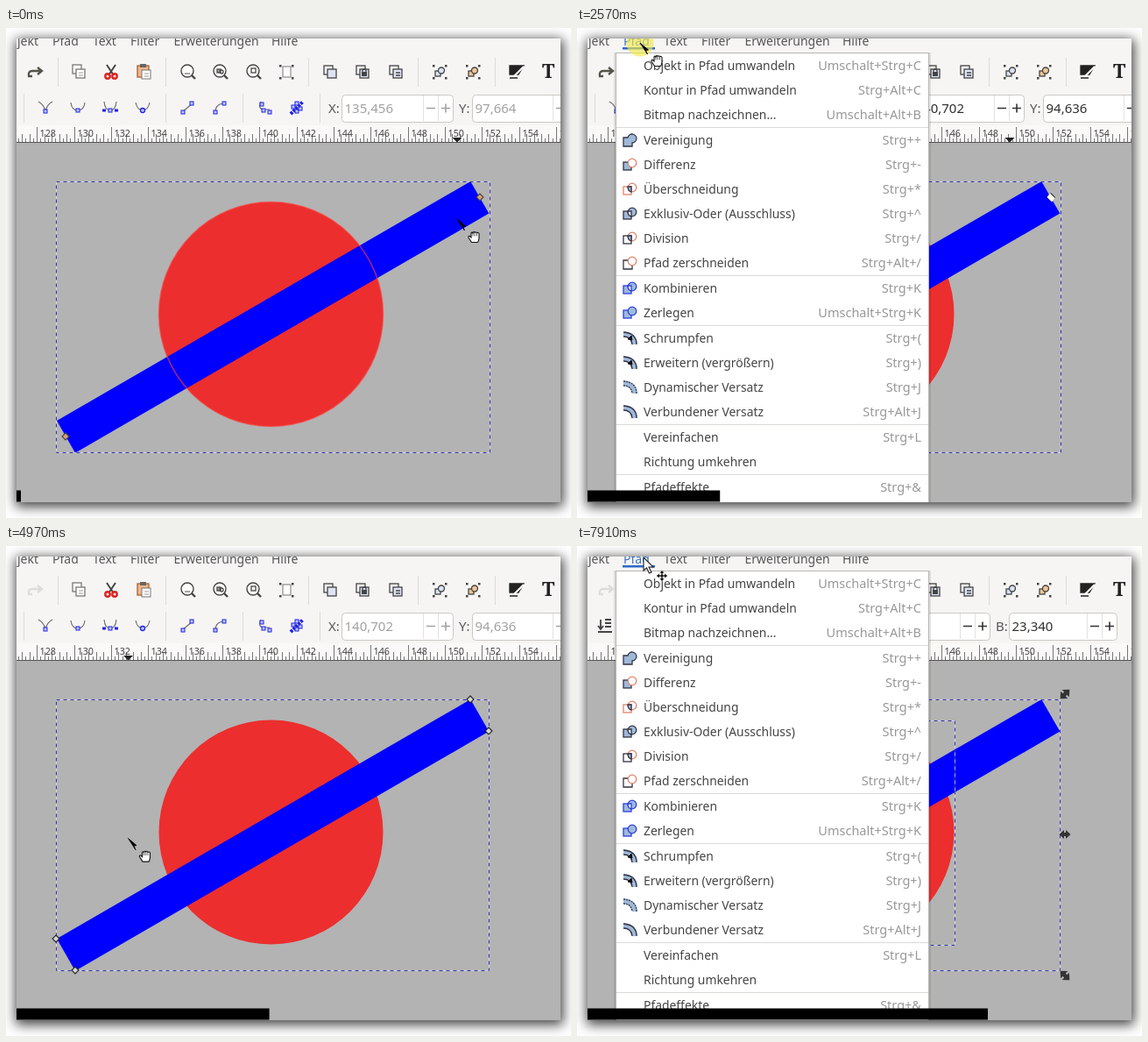
An HTML page that plays this animation: 645 px wide and 559 px high, repeating every 8000 ms.

```html
<!DOCTYPE html>
<html lang="de">
<head>
<meta charset="utf-8">
<title>Objekt in Pfad umwandeln</title>
<style>
html, body { margin: 0; width: 100%; height: 100%; overflow: hidden; background: #fff; }
#shadow { position: absolute; left: 12px; top: 12px; width: 621px; height: 529px; box-shadow: 1px 3px 13px 2px rgba(0,0,0,.75); }
svg { position: absolute; left: 0; top: 0; display: block; }
text { font-family: "Noto Sans", "Open Sans", sans-serif; white-space: pre; }
.off { display: none; }
</style>
</head>
<body>
<div id="shadow"></div>
<svg id="stage" width="645" height="559" viewBox="0 0 645 559"></svg>
<script>
const LOOP = 8000, STEP = 77.5, LAST = 102;
const INK = '#444', NODE = '#2222e0';

const text = (x, y, s, size = 14, fill = INK, extra = '') =>
  `<text x="${x}" y="${y}" font-size="${size}" fill="${fill}" ${extra}>${s}</text>`;
const rect = (x, y, w, h, extra) => `<rect x="${x}" y="${y}" width="${w}" height="${h}" ${extra}/>`;
const path = (d, stroke = INK, fill = 'none', w = 1.3, extra = '') =>
  `<path d="${d}" stroke="${stroke}" fill="${fill}" stroke-width="${w}" ${extra}/>`;
const circle = (x, y, r, stroke = INK, fill = 'none', w = 1.3) =>
  `<circle cx="${x}" cy="${y}" r="${r}" stroke="${stroke}" fill="${fill}" stroke-width="${w}"/>`;
const at = (x, y, body, extra = '') => `<g transform="translate(${x} ${y}) ${extra}">${body}</g>`;
const group = (id, body) => `<g id="${id}">${body}</g>`;
const divider = (x, y) => rect(x, y - 16, 1, 33, 'fill="#dedbd8"');
const box = (x, y, s, fill = 'none', stroke = INK) =>
  rect(x, y, s, s, `fill="${fill}" stroke="${stroke}" stroke-width="1.3"`);
const dashed = (x, y, w, h) => {
  const d = `M${x} ${y}h${w}v${h}h${-w}z`;
  return path(d, '#e4e4f4', 'none', 1, 'opacity=".75"') +
         path(d, '#3434b4', 'none', 1, 'stroke-dasharray="4 4"');
};

// Upper toolbar
const lens = body => circle(-1, -1, 7, INK, '#fff', 1.4) + path('M4 4L8 8', INK, 'none', 2.4) + body;
const padlock = rect(-1, 0, 6, 5, `fill="${INK}"`) + path('M0 0v-2q2-2 4 0v2');
const stack = body => box(-7, -7, 10, '#f6f5f4') + box(-3, -3, 10, '#dfe3f4') + body;
const corners = fill => [[-8, -8], [6, -8], [-8, 6], [6, 6]]
  .map(([x, y]) => rect(x, y, 2.5, 2.5, `fill="${fill}"`)).join('');
const grouped = fill => corners(INK) + box(-5, -1, 6, fill) + circle(2, -1.5, 3.5, INK, fill);

function upperBar() {
  const redo = 'M7 -1H-3q-5 0 -4 6h4M3 -5l5 4-5 4';
  const icons = [
    [83, box(-7, -8, 10, '#fff', '#777') + box(-3, -3, 10, '#fff', '#777') + path('M0 1h5M0 4h5', '#999', 'none', 1)],
    [120, path('M-5 -8L3 4M5 -8L-3 4', '#444', 'none', 2) + circle(-4, 5, 2.7, '#d22', 'none', 2.4) + circle(4, 5, 2.7, '#d22', 'none', 2.4)],
    [157, box(-7, -7, 13, '#efb78c', '#a8602e') + rect(-4, -9, 7, 4, 'fill="#666"') + rect(-2, -2, 10, 10, 'fill="#fff" stroke="#777"') + path('M1 2h5M1 5h5', '#999', 'none', 1)],
    [208, lens(path('M-4 2h6', '#777'))],
    [245, lens(box(-4, -3, 4, '#aaa') + circle(1, 0, 2))],
    [283, lens(box(-3, -4, 5))],
    [320, rect(-4, -6, 9, 12, 'fill="#fff" stroke="#777"') + corners(INK)],
    [370, stack('')],
    [407, stack(padlock)],
    [445, stack(path('M0 1h5M0 4h5', INK, 'none', 1.6))],
    [495, grouped('#d9e1f5')],
    [533, grouped('#f0c596')],
    [583, path('M-8 -7H8L2 3H-8z', '#222', '#222') + path('M8 -6L-3 5', '#fff', 'none', 2.2) + path('M-8 7H1', '#222', 'none', 1.5)]
  ];
  return group('redo', at(33, 50, path(redo, '#54534b', 'none', 2.3))) +
    icons.map(([x, body]) => at(x, 50, body)).join('') +
    [59, 182, 345, 470, 558].map(x => divider(x, 50)).join('') +
    text(612, 57, 'T', 22, '#222', 'font-weight="bold" style="font-family:\'Noto Serif\',serif"');
}

// Lower toolbars
function field(label, x, end, id, value) {
  const line = dx => rect(end - dx, 77, 1, 29, 'fill="#e4e1de"');
  return text(x - 16, 97, label, 15, '#555') +
    rect(x - .5, 76.5, end - x, 31, 'rx="4" fill="#fff" stroke="#cdc7c2"') + line(35) + line(18) +
    `<g class="entry">${text(x + 2.5, 97, value, 15, '#303030', `id="${id}"`)}` +
    path(`M${end - 31} 91.5h10M${end - 14} 91.5h10m-5 -5v10`, '#333', 'none', 1.6) + '</g>';
}

function nodeBar() {
  const dot = (x, y) => rect(x - 2, y - 2, 4, 4, `fill="#b9c6ff" stroke="${NODE}"`);
  const curve = d => path(d, '#666', 'none', 1.1);
  const icons = [
    [45, curve('M-8 -7Q-2 -4 0 4Q2 -4 8 -7') + dot(0, 4)],
    [82, curve('M-8 -6Q-7 3 0 3Q7 3 8 -6') + dot(0, 3)],
    [119, curve('M-7 -7Q-6 3 0 3Q6 3 7 -7') + dot(0, 3) + path('M-9 3h4M5 3h4', NODE, 'none', 3)],
    [156, curve('M-8 -6Q-6 3 0 3Q6 3 8 -6') + circle(0, 3, 2.5, NODE, '#b9c6ff')],
    [207, curve('M-6 5L6 -5') + dot(-5, 5) + dot(5, -5)],
    [244, curve('M-5 5Q-5 -5 6 -5') + dot(-5, 5) + dot(5, -5)],
    [295, curve('M-4 -7Q-8 2 0 2H6') + dot(-3, -4) + dot(-1, 3) + dot(6, 5)],
    [332, path('M-7 7L7 -7', NODE, 'none', 4, 'stroke-dasharray="3 1"') + dot(-4, -1) + dot(0, 4) + dot(4, 1) + dot(0, -5)]
  ];
  return icons.map(([x, body]) => at(x, 91, body)).join('') +
    [20, 182, 270, 358].map(x => divider(x, 91)).join('') +
    field('X:', 384, 511, 'nodeX', '') + field('Y:', 533, 659, 'nodeY', '');
}

function selectBar() {
  const bars = 'M-1 -6h8M-1 -2h5M-1 2h8M-1 6h5';
  const icons = [
    [32, path('M-8 7H8M0 -7H7M0 -3H7M0 1H7M-5 -7V3m-3 -3l3 4 3-4', INK, 'none', 1.8)],
    [69, path(bars + 'M-8 0h6m-3 -3l-3 3 3 3', INK, 'none', 1.8)],
    [106, path('M-7 -7V7M-7 -5H4M-7 -1H1M-7 3H8M2 0l4 3-4 3', INK, 'none', 1.8)],
    [143, path('M-8 -7H8M-7 -3h6M-7 1h6M-7 5h6M4 7V-3m-3 3l3-4 3 4', INK, 'none', 1.8)]
  ];
  return icons.map(([x, body]) => at(x, 91, body)).join('') + divider(169, 91) +
    field('X:', 195, 323, 'selX', '129,031') + field('Y:', 344, 472, 'selY', '87,320') +
    field('B:', 494, 617, 'selB', '23,340');
}

function ruler() {
  let ticks = '', labels = '';
  for (let i = -6; i < 142; i++) {
    const x = Math.round(35.2 + i * 4.234) + .5, major = i % 10 === 0;
    ticks += `M${x} 130V${major ? 113 : i % 2 ? 126 : 121}`;
    if (major) labels += text(x + 3, 124, 128 + i / 5, 10.8, '#444');
  }
  return rect(12, 111, 621, 19, 'fill="#faf9f8"') + path(ticks, '#777', 'none', 1) + labels +
    path('M12 130.5H633', '#555', 'none', 1) + group('marker', '<path d="M-5.5 125h11l-5.5 5.5z" fill="#222"/>');
}

// Canvas objects and their handles
const DIAMOND = 'M0 -4L4 0 0 4-4 0z';
const ARROW = 'M-6.5 0L-1 -5V-2H1V-5L6.5 0 1 5V2H-1V5z';
const ends = [[541, 193], [68, 466]];

function drawing() {
  const arrow = (x, y, angle, scale = 1) =>
    at(x, y, `<path d="${ARROW}" fill="#333"/>`, `rotate(${angle}) scale(${scale})`);
  const arrows = [arrow(51, 329, 0), arrow(557, 329, 0), arrow(304, 169, 90), arrow(304, 490, 90),
    arrow(51, 169, 45, 1.15), arrow(557, 490, 45, 1.15), arrow(557, 169, -45, 1.15), arrow(51, 490, -45, 1.15)];
  return rect(12, 131, 621, 410, 'fill="#b3b3b3"') +
    '<circle cx="302.5" cy="326.5" r="128" fill="#ec2e2e"/>' +
    '<path d="M530.3 175L551.3 211.6 79 484.7 58 448z" fill="#00f"/>' +
    group('outline', '<circle cx="302.5" cy="326.5" r="128" fill="none" stroke="#ff3c3c" stroke-opacity=".62" stroke-width="1.5"/>') +
    group('wideBox', dashed(57.5, 175.5, 495, 309)) + group('tightBox', dashed(57.5, 175.5, 494, 309)) +
    group('circleBox', dashed(175.5, 199.5, 256, 256)) +
    group('idleNodes', ends.map(([x, y]) => at(x, y, path(DIAMOND, '#444', '#d9a07c', 1.1))).join('')) +
    group('pickedNodes', ends.map(([x, y]) => at(x, y,
      path('M0 -4.5L4.5 0 0 4.5 -4.5 0z', '#333', '#333', 1) + path('M-4 0L-1 -4 4 1 1 5z', '#fff', '#fffbe8', .8))).join('')) +
    group('cornerNodes', [[530, 175], [551, 211], [79, 484], [57, 448]]
      .map(([x, y]) => at(x, y, path(DIAMOND, '#222', '#d8d8d8', 1.1))).join('')) +
    group('arrows', arrows.join(''));
}

// Path menu: [centre y, label, shortcut, icon]
const LIGHT = '#9fb9d8', RED = '#e0826a', BLUE = '#2a3fe0';
const overlap = (stroke, fill) => path('M-2 -3H2V3Q-2 2 -2 -3z', stroke, fill);
const pair = (square, round, fill) => box(-7, -3, 9, fill, square) + circle(3, -2, 4.8, round, fill);
const offset = dash => path('M-7 -5Q5 -4 6 7', LIGHT, 'none', 6) +
  path('M-7 -7Q8 -6 8 7M-7 -2Q2 -2 3 7', '#334', 'none', 1.3, dash ? 'stroke-dasharray="2 1"' : '');
const inset = offset(false) + path('M-2 1l4-4 1 5z', '#111', '#111', 1);
const items = [
  [43, 'Objekt in Pfad umwandeln', 'Umschalt+Strg+C', ''],
  [71, 'Kontur in Pfad umwandeln', 'Strg+Alt+C', ''],
  [99, 'Bitmap nachzeichnen...', 'Umschalt+Alt+B', ''],
  [128, 'Vereinigung', 'Strg++', path('M-7 -3H-2A5 5 0 1 1 3 3V7H-7z', '#334', LIGHT)],
  [156, 'Differenz', 'Strg+-', box(-7, -3, 9, LIGHT, '#334') + circle(3, -2, 4.8, RED, '#fff')],
  [184, 'Überschneidung', 'Strg+*', pair(RED, RED, 'none') + overlap('#334', LIGHT)],
  [212, 'Exklusiv-Oder (Ausschluss)', 'Strg+^', pair('#334', '#334', LIGHT) + overlap('#334', '#fff')],
  [240, 'Division', 'Strg+/', pair('#334', RED, 'none') + overlap('#334', LIGHT)],
  [268, 'Pfad zerschneiden', 'Strg+Alt+/', path('M-2 -3H-7V7H3V3', '#334') + circle(3, -2, 4.8, RED)],
  [297, 'Kombinieren', 'Strg+K', pair(BLUE, BLUE, LIGHT) + overlap(BLUE, '#fff')],
  [325, 'Zerlegen', 'Umschalt+Strg+K', pair(BLUE, BLUE, LIGHT)],
  [354, 'Schrumpfen', 'Strg+(', inset],
  [382, 'Erweitern (vergrößern)', 'Strg+)', inset],
  [410, 'Dynamischer Versatz', 'Strg+J', offset(true)],
  [438, 'Verbundener Versatz', 'Strg+Alt+J', offset(false)],
  [467, 'Vereinfachen', 'Strg+L', ''],
  [495, 'Richtung umkehren', '', ''],
  [524, 'Pfadeffekte', 'Strg+&amp;', '']
];
const row = ([y, label, keys], ink, dim) =>
  text(76, y + 5, label, 13.9, ink) + text(393, y + 5, keys, 14.5, dim, 'text-anchor="end"');

function menu() {
  return rect(42, 28, 362, 520, 'fill="#000" opacity=".1"') +
    rect(44.5, 28.5, 357, 520, 'fill="#fff" stroke="#b9b6b3"') +
    items.map(item => row(item, INK, '#989898') + at(60, item[0], item[3])).join('') +
    [113, 282, 339, 452, 509].map(y => rect(45, y, 356, 1, 'fill="#dcdad7"')).join('') +
    group('hover', rect(45, 29, 356, 28, 'fill="#3584e4"') + row(items[0], '#fff', '#d5e4f8'));
}

function menuBar() {
  return [[13, 'jekt'], [99, 'Text'], [142, 'Filter'], [191.5, 'Erweiterungen'], [303, 'Hilfe']]
    .map(([x, s]) => text(x, 20, s, 14, '#555')).join('') +
    group('pathIdle', text(53, 20, 'Pfad', 14, '#555')) +
    group('pathOpen', text(53, 20, 'Pfad', 14, '#3d72c4') + rect(52, 22, 37, 2.5, 'fill="#2f68c8"'));
}

const HAND = 'M-3 6.5L-6.5 1q-.5-2 1.5-1.5L-3.5 1V-4q1-1.8 2 0q1-2.4 2.2-.6q1.2-1.6 2.3.4q1.6-1 2.5.6V2Q5 5 4 6.5z';
const FINGERS = 'M-1.5 -4V-.5M.7 -4.5V-.5M3 -4V-.5';
const MOVE = 'M0 -6.5L3 -3H1V-1H3V-3L6.5 0 3 3V1H1V3H3L0 6.5-3 3H-1V1H-3V3L-6.5 0-3 -3V-1H-1V-3H-3z';
const pointers =
  group('nodePointer', path('M0 0L9.5 8 6.5 8.5 8.5 13z', '#000', '#000', .8) +
    at(19.5, 20, path(HAND, '#111', '#fff', 1.1) + path(FINGERS, '#333', 'none', .8))) +
  group('selectPointer', path('M0 0V15L3.5 12 6.5 18 9 17 6 11H11z', '#222', '#fff', 1.1) + at(21, 21, path(MOVE, '#fff', '#111', .6)));

document.getElementById('stage').innerHTML =
  '<svg x="12" y="12" width="621" height="529" viewBox="12 12 621 529">' +
  rect(12, 12, 621, 120, 'fill="#f6f5f4"') + menuBar() + upperBar() +
  group('nodeBar', nodeBar()) + group('selectBar', selectBar()) + drawing() + ruler() +
  group('menu', menu()) + group('click', '<circle r="15.5" fill="#f2e84a" fill-opacity=".65"/>') +
  group('pointer', pointers) + rect(12, 527.5, 5, 13, 'id="bar" fill="#000"') + '</svg>';

const $ = id => document.getElementById(id);
const show = (id, on) => $(id).classList.toggle('off', !on);
const between = (t, a, b) => t >= a && t < b;

// Pointer tracks: [ms, x, y]
const tracks = [
  [[0, 515, 218], [500, 512, 222], [900, 505, 222], [1300, 500, 200], [1480, 494, 140], [1510, 494, 126],
   [1720, 215, 94], [1860, 165, 85], [2150, 118, 56], [2400, 72, 17], [2650, 72, 17], [2950, 105, 44], [3570, 118, 44]],
  [[4340, 330, 300], [4700, 250, 330], [5060, 97, 335]],
  [[6040, 112, 340], [6400, 290, 300], [6700, 305, 290], [6950, 305, 230], [7080, 305, 126],
   [7207, 175, 112], [7450, 122, 60], [7672, 90, 22], [7750, 76, 13], [8000, 76, 13]]
];

function pointerAt(t) {
  const track = tracks.find(k => between(t, k[0][0], k[k.length - 1][0]));
  if (!track) return null;
  const i = track.findIndex(k => k[0] > t), [a, ax, ay] = track[i - 1], [b, bx, by] = track[i];
  const u = (t - a) / (b - a);
  return [ax + (bx - ax) * u, ay + (by - ay) * u];
}

const PICK = 1240, CONVERT = 3560, SELECT = 5500, ADD = 6500;

function draw(now) {
  const frame = Math.min(LAST, Math.floor((now % LOOP + 1) / STEP)), t = frame * STEP;
  const nodeTool = t < SELECT, picked = between(t, PICK, CONVERT);
  const open = between(t, 2470, CONVERT) || t >= 7800;

  $('bar').setAttribute('width', 5 + 452 * frame / LAST);
  $('redo').setAttribute('opacity', t < CONVERT ? 1 : .15);
  show('nodeBar', nodeTool);
  show('selectBar', !nodeTool);
  $('nodeX').textContent = t < PICK ? '135,456' : '140,702';
  $('nodeY').textContent = t < PICK ? '97,664' : '94,636';
  document.querySelectorAll('#nodeBar .entry').forEach(e => e.setAttribute('opacity', picked ? 1 : .45));

  show('outline', t < 500 || between(t, 4340, 4900));
  show('wideBox', t < CONVERT);
  show('tightBox', t >= CONVERT);
  show('idleNodes', t < PICK);
  show('pickedNodes', picked);
  show('cornerNodes', between(t, CONVERT, SELECT));
  show('arrows', !nodeTool);
  show('circleBox', t >= ADD);

  show('menu', open);
  show('pathOpen', open);
  show('pathIdle', !open);

  const p = pointerAt(t);
  show('pointer', p);
  show('nodePointer', nodeTool);
  show('selectPointer', !nodeTool);
  show('hover', p && nodeTool && p[1] > 29);
  show('click', p && (between(t, 2440, 2640) || between(t, 3440, CONVERT) || between(t, ADD - 80, ADD + 80)));
  show('marker', p);
  if (p) {
    $('pointer').setAttribute('transform', `translate(${p})`);
    $('click').setAttribute('transform', `translate(${p})`);
    const x = p[1] > 130 ? p[0] : nodeTool ? 494 : 305;
    $('marker').setAttribute('transform', `translate(${x} 0)`);
  }
}

const start = performance.now();
function tick() {
  draw(performance.now() - start);
  requestAnimationFrame(tick);
}
tick();
</script>
</body>
</html>
```
